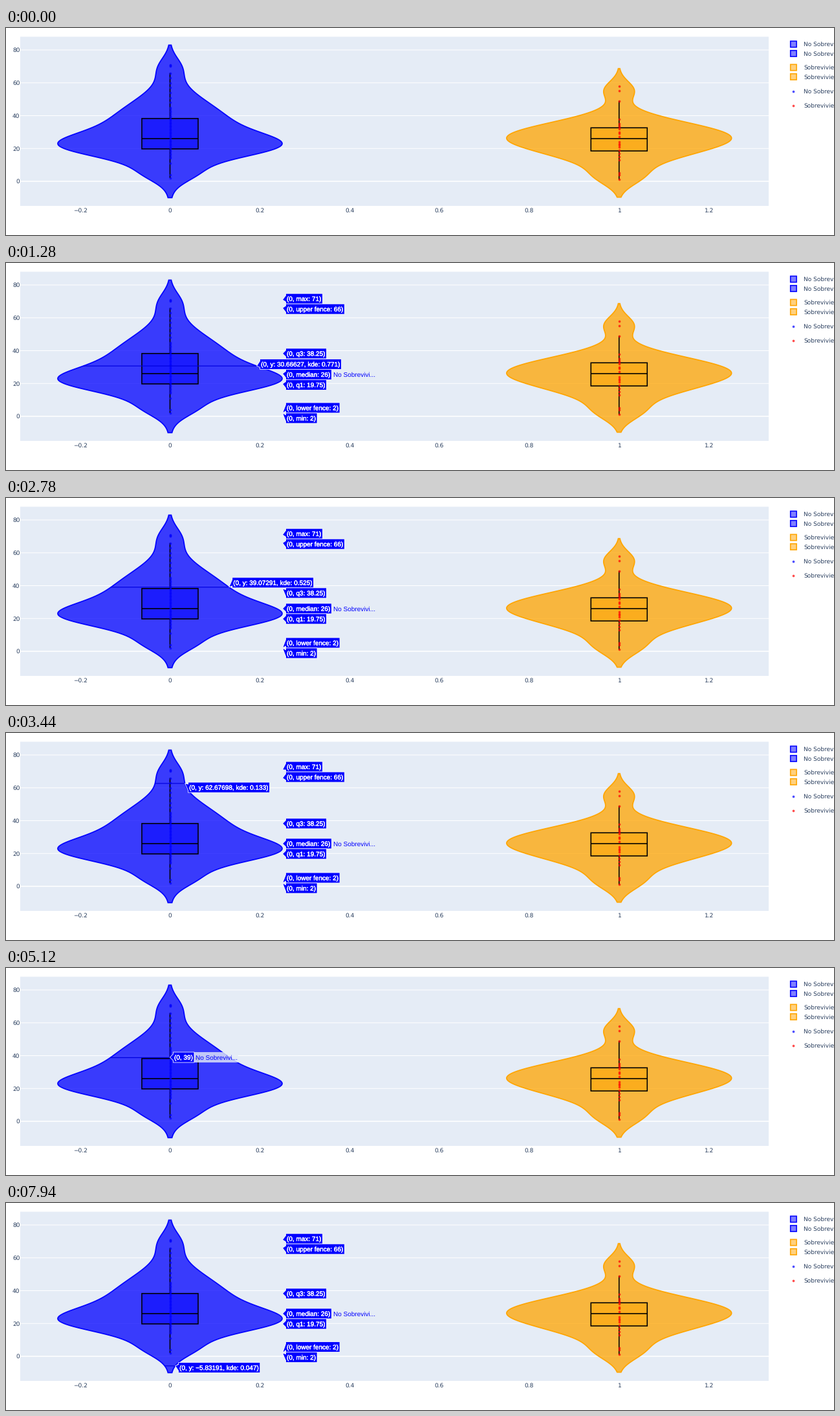
A matplotlib script that plays this animation: 1280 px wide and 320 px high, repeating every 8000 ms.

```python
import numpy as np
import matplotlib.pyplot as plt
from matplotlib.animation import FuncAnimation
from matplotlib.patches import Polygon, Rectangle
from matplotlib.patheffects import withStroke

plt.rcParams.update({"path.snap": False, "text.hinting": "none"})

W, H, DPI = 1280, 320, 100
PT = 72 / DPI  # points per pixel
LOOP, STEP, TICK = 8000, 20, 60
BLUE, ORANGE, INK, PANEL = "#0000ff", "#ffa500", "#2a3f5f", "#e5ecf6"
HALF_WIDTH, HALF_BOX = 174, 43.5

# Relative density as bell curves: (height, mean age, spread)
DENSITY_0 = [(.125, 4.5, 5.2), (.5545, 21.5, 6.87), (.547, 32.6, 15.9), (.075, 69.5, 6.3)]
DENSITY_1 = [(.19, 3.5, 6), (.075, 14.5, 5), (.995, 26.5, 9.4), (.128, 55.5, 5.5)]
AGES_0 = [2, 4, 11, *range(14, 46), *range(48, 67, 3), 70, 70.5, 71]
AGES_1 = [1, 4, 5, *range(13, 20, 2), *range(21, 25), 27, 29, 30,
          *range(32, 36), 38, 49, 55, 58]
STATS = {"max": 71, "upper fence": 66, "q3": 38.25, "median": 26,
         "q1": 19.75, "lower fence": 2, "min": 2}
NAME = "No Sobrevivi..."

# Pointer path as (time, age under the pointer)
POINTER = [(500, 78.3), (1280, 30.66627), (1700, 20.2), (1880, 20.2),
           (2180, 24.68297), (2750, 38), (3440, 62.67698), (4400, 82),
           (4760, 79.5), (5120, 38.8), (5300, 38.8), (6140, 19.3), (6440, 11.4),
           (6980, 3.8), (7100, 3.8), (7400, 1.8), (7820, 1.8), (7940, -5.83191)]


def px_x(value):
    return 253.5 + 694.25 * value


def px_y(age):
    return 237 - 2.5375 * np.asarray(age, float)


def density(bells, age):
    return sum(a * np.exp(-((age - m) / s) ** 2 / 2) for a, m, s in bells)


def signed(number, spec):
    return format(number, spec).replace("-", "\u2212")


fig = plt.figure(figsize=(W / 100, H / 100), dpi=DPI, facecolor="white")
ax = fig.add_axes([0, 0, 1, 1])
ax.set_xlim(0, W)
ax.set_ylim(H, 0)
ax.axis("off")


def text(x, y, s, color=INK, size=9, font="DejaVu Sans", ha="left", z=1):
    return ax.text(x, y + 0.36 * size, s, color=color, fontsize=size * PT,
                   family=font, ha=ha, va="baseline", zorder=z)


def rect(x, y, w, h, **style):
    return ax.add_patch(Rectangle((x, y), w, h, **style))


def line(xs, ys, color, width, z):
    return ax.plot(xs, ys, color=color, lw=width * PT, zorder=z,
                   solid_capstyle="butt")[0]


def framed(x, y, w, h, fill, edge, z):
    rect(x, y, w, h, fc=fill, alpha=0.5, lw=0, zorder=z)
    rect(x, y, w, h, fill=False, ec=edge, lw=1.6 * PT, zorder=z)


def dots(x, ys, color):
    ax.scatter(np.full(len(ys), x), ys, s=(3.7 * PT) ** 2, color=color,
               alpha=0.7, linewidths=0, zorder=4)


def violin(center, bells, ages, bandwidth, color, q1, median, q3, fence):
    cx = px_x(center)
    span = np.linspace(min(ages) - 2 * bandwidth, max(ages) + 2 * bandwidth, 120)
    half, ys = HALF_WIDTH * density(bells, span), px_y(span)
    outline = np.column_stack([np.r_[cx - half, (cx + half)[::-1]],
                               np.r_[ys, ys[::-1]]])
    ax.add_patch(Polygon(outline, fc=color, alpha=0.75, lw=0, zorder=2))
    ax.add_patch(Polygon(outline, fill=False, ec=color, lw=1.7 * PT, zorder=2))

    top, middle, bottom = px_y([q3, median, q1])
    framed(cx - HALF_BOX, top, 2 * HALF_BOX, bottom - top, color, "black", 3)
    line([cx - HALF_BOX, cx + HALF_BOX], [middle, middle], "black", 1.6, 3)
    line([cx, cx], [px_y(fence), top], "black", 1.6, 3)
    line([cx, cx], [bottom, px_y(min(ages))], "black", 1.6, 3)
    dots(cx, px_y(ages), "red" if center else BLUE)


def draw_chart():
    rect(22, 13.5, 1157, 261.5, fc=PANEL, lw=0, zorder=0)
    for age in range(0, 81, 20):
        y = px_y(age)
        line([22, 1179], [y, y], "white", 1 if age else 1.6, 1)
        text(21.5, y, str(age), ha="right")
    for i in range(-1, 7):
        text(px_x(i / 5), 282, signed(i / 5, "g"), ha="center")
    violin(0, DENSITY_0, AGES_0, 6, BLUE, 19.75, 26, 38.25, 66)
    violin(1, DENSITY_1, AGES_1, 5.35, ORANGE, 18.5, 26, 32.6, 49)

    groups = [(25, "No Sobreviviente", BLUE), (61, "Sobreviviente", ORANGE)]
    for top, name, color in groups:
        for y in (top, top + 14.4):
            framed(1212.7, y - 4.7, 9.4, 9.4, color, color, 1)
            text(1233, y, name)
    for y, name, color in [(97.5, groups[0][1], BLUE), (119.5, groups[1][1], "red")]:
        dots(1217.4, [y], color)
        text(1233, y, name)


def spread(ys, gap=16):
    """Move sorted label centres as little as needed to keep them apart."""
    shift = gap * np.arange(len(ys))
    z = np.asarray(ys) - shift
    n = len(z)
    return [max(min(z[a:b + 1].mean() for b in range(i, n))
                for a in range(i + 1)) + shift[i] for i in range(n)]


def hover_label(x, y, cy, s, named=False):
    label = text(x + 6.5, cy, s, "white", 10, "Liberation Sans", z=8)
    left, right = x + 5, x + 8.5 + label.get_window_extent().width
    label.set_path_effects([withStroke(linewidth=0.35 * PT, foreground="white")])
    shape = [(x, y), (left, cy - 5), (left, cy - 8), (right, cy - 8),
             (right, cy + 8), (left, cy + 8), (left, cy + 5)]
    parts = [label, ax.add_patch(Polygon(shape, fc=BLUE, ec="white", lw=0.8 * PT,
                                         joinstyle="round", zorder=7))]
    if named:
        parts += [rect(right, cy - 8, 68, 16, fc=PANEL, alpha=0.8, lw=0, zorder=6),
                  text(right + 2.5, cy, NAME, BLUE, 10, "Liberation Sans", z=8)]
    return parts


def stat_labels(age, kde):
    rows = [(px_y(v), px_x(0) + HALF_WIDTH, f"(0, {key}: {v})", key == "median")
            for key, v in STATS.items()]
    rows.append((px_y(age), px_x(0) + HALF_WIDTH * kde,
                 f"(0, y: {signed(age, '.5f')}, kde: {kde:.3f})", False))
    rows.sort(key=lambda row: row[0])
    parts = []
    for (y, x, s, named), cy in zip(rows, spread([row[0] for row in rows])):
        parts += hover_label(x, y, cy, s, named)
    return parts


hover = []


def update(frame):
    while hover:
        hover.pop().remove()
    t = frame * STEP
    tick = 500 + (t - 500) // TICK * TICK
    if t < 500 or 4460 <= tick < 4760:
        return
    age = np.interp(tick, *zip(*POINTER))
    kde = density(DENSITY_0, age)
    half, y = HALF_WIDTH * kde, px_y(age)
    hover.append(line([px_x(0) - half, px_x(0) + half], [y, y], "#0000e0", 1.2, 5))
    if 5000 <= tick < 7880:
        near = min(AGES_0, key=lambda a: abs(a - age))
        y = px_y(near)
        hover.extend(hover_label(px_x(0), y, y, f"(0, {near})", True))
    else:
        hover.extend(stat_labels(age, kde))


draw_chart()
anim = FuncAnimation(fig, update, frames=LOOP // STEP, interval=STEP,
                     repeat=True, repeat_delay=0, blit=False)
plt.show()
```
